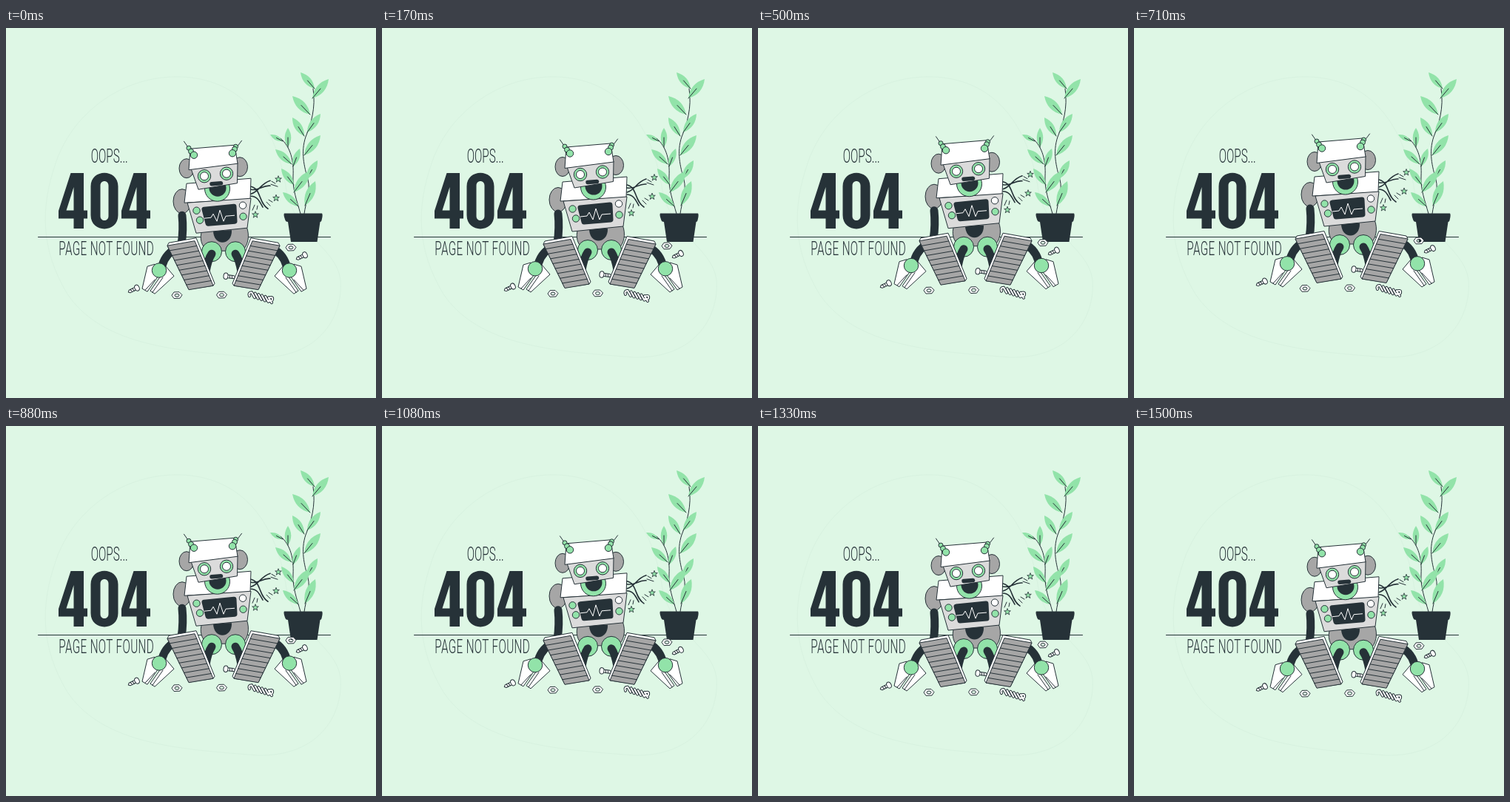
Write an HTML page that moves like this. It is 500x500 px and loops after 1.54 s.

```html
<!DOCTYPE html>
<html lang="en">
<head>
<meta charset="utf-8">
<title>Page not found</title>
<style>
  html, body { margin: 0; width: 100%; height: 100%; overflow: hidden; background: #def7e5; }
  svg { display: block; width: 100%; height: 100%; }
  text { font: 300 25px Roboto, sans-serif; text-anchor: middle; fill: #263238; }
  .ink { fill: #263238; }
  .line { fill: none; stroke: #263238; stroke-linecap: round; }
  .tube { fill: none; stroke: #263238; stroke-width: 11; stroke-linecap: round; }
  .part { stroke: #263238; stroke-linejoin: round; }
  .white { fill: #fff; }
  .light { fill: #dbdbdb; }
  .gray { fill: #a6a6a6; }
  .green { fill: #92e3a9; }
</style>
</head>
<body>
<svg viewBox="0 0 500 500">
  <defs>
    <g id="forearm">
      <path class="tube" d="M234 297C224 301 215 308 211 322"/>
      <path class="part white" d="M191 323L201 320L205 337L191 357L184 353Z"/>
      <path class="part white" d="M216 323L227 336L201 360L195 356L209 336Z"/>
      <path class="line" d="M201 341L188 355M212 338L198 358"/>
      <circle class="part green" cx="207" cy="328.3" r="9.7"/>
    </g>
    <g id="leg">
      <circle class="part green" cx="278" cy="303" r="13.5"/>
      <path class="tube" d="M278 306Q273 313 270 330"/>
      <path class="part white" d="M218 295L220 291L257 284.500L282 346L280 349L247 354Z"/>
      <path class="part gray" d="M218 295L255 288.500L280 349L247 354.500Z"/>
      <path class="line" id="treads"/>
    </g>
    <path id="nut" class="part white" fill-rule="evenodd" d="M-7 0L-4 -4.300L3 -4.500L7 -.500L4 4L-4 4.300ZM-3 0A3 2 0 0 0 3 0A3 2 0 0 0 -3 0Z"/>
    <g id="screw">
      <path class="part white" d="M0 -2H11L13 0L11 2H0Z"/>
      <path class="line" d="M5 -2L6 2M8 -2L9 2"/>
      <ellipse class="part white" rx="3" ry="4.2"/>
    </g>
    <path id="star" class="part green" stroke-width=".8" d="M0 -4.5L1.2 -1.3L4.3 -1.3L1.8 .8L2.8 4L0 2L-2.8 4L-1.8 .8L-4.3 -1.3L-1.2 -1.3Z"/>
    <path id="coil" d="M329 363Q327 358 332 358"/>
  </defs>

  <path fill="none" stroke="#d8f2e0" d="M235 66C160 64 92 112 68 180C45 245 48 300 82 358C130 432 240 437 340 445C425 447 456 388 452 340C446 297 392 281 379 220C365 125 315 68 235 66Z"/>

  <text transform="translate(139.7 182) scale(.61 1)">OOPS...</text>
  <g class="ink" fill-rule="evenodd" role="img" aria-label="404">
    <path id="four" d="M87.500 196H105V246.500H110V257.500H105V271H91.500V257.500H71V247ZM91.500 246.500V215L81.500 246.500Z"/>
    <path d="M114.500 214C114.500 189.500 151.500 189.500 151.500 214V253C151.500 277.500 114.500 277.500 114.500 253ZM127.500 213V254C127.500 262 138.500 262 138.500 254V213C138.500 205 127.500 205 127.500 213Z"/>
    <use href="#four" x="85"/>
  </g>
  <text transform="translate(135.700 307) scale(.61 1)" letter-spacing=".6">PAGE NOT FOUND</text>
  <path class="line" d="M43.500 282.500H438.500"/>

  <g id="plant">
    <path class="line" d="M403 251C405 235 412 220 408 205C403 187 398 168 405 147C412 130 419 108 415 82"/>
    <path class="line" d="M398 251C393 233 387 218 388 200C389 180 385 161 371 149"/>
  </g>
  <path class="ink" d="M376 250.500H427Q428.500 252 426.500 260Q426 262 424.500 262L420.500 289H385L381 262Q378 262 377.500 260Q374.500 252 376 250.500Z"/>

  <g id="robot">
    <g class="line" stroke-width="1.6">
      <path d="M331 225C342 222 344 211 357 207M331 219C343 221 346 213 357 214M331 215C345 218 341 237 354 245M331 228C340 228 343 236 347 243"/>
      <path stroke-width="1" d="M359 208L364 211M358 212L367 215M355 233L360 236M352 236L357 241M336 240L333 247M340 241L339 246"/>
    </g>
    <use href="#star" x="368" y="205"/>
    <use href="#star" x="365" y="230.500"/>
    <use href="#star" x="337" y="253"/>

    <ellipse class="part gray" cx="238" cy="235" rx="12" ry="16.500"/>
    <path class="tube" d="M238 254Q240 273 237 293"/>

    <path class="part gray" d="M265 274L325 269C330 282 327 295 319 302H272C264 295 261 285 265 274Z"/>
    <path class="ink" d="M280 274H305C306 295 280 297 280 274Z"/>
    <use href="#forearm"/>
    <use href="#forearm" transform="matrix(-1 0 0 1 590 0)"/>

    <path class="part white" d="M244 211L331 204L330 232L241 237Z"/>
    <path class="part light" d="M245 237L331 231L326 271L257 278Z"/>
    <circle class="part green" cx="257.500" cy="247.500" r="4.700"/>
    <circle class="part green" cx="262" cy="260.500" r="4.700"/>
    <circle class="part white" cx="320" cy="240.500" r="4.700"/>
    <circle class="part green" cx="320.500" cy="255.500" r="4.700"/>
    <path class="part ink" stroke-width="7" d="M268 246L308 242L309 262L273 265Z"/>
    <path fill="none" stroke="#fff" d="M268 258L277 257L280 252L285 262L289 247L294 262L297 255L309 254"/>

    <circle class="part green" cx="285.500" cy="218" r="17"/>
    <circle class="ink" cx="286" cy="217" r="11.500"/>
    <ellipse class="part gray" cx="244" cy="190.500" rx="10" ry="13"/>
    <ellipse class="part gray" cx="316" cy="188.500" rx="10.500" ry="13"/>
    <path class="part light" d="M250 191L313 183L312.500 210.500L260 219Z"/>
    <path class="part white" d="M249 164L309 159L313 184L247 192.500Z"/>
    <circle class="part green" cx="268" cy="201" r="8.700"/>
    <circle class="part white" cx="268" cy="201" r="5.500"/>
    <circle class="part green" cx="298" cy="197.500" r="8.700"/>
    <circle class="part white" cx="298" cy="197.500" r="5.500"/>
    <path class="line" stroke-width="5.500" d="M278 211.500L290.500 210.500"/>
    <path class="line" d="M240.500 154L253 172M318.500 153L305 171"/>
    <g class="part green">
      <circle cx="247" cy="163" r="3"/>
      <circle cx="250" cy="167.500" r="3.500"/>
      <circle cx="254" cy="172.500" r="4.700"/>
      <circle cx="310.500" cy="161" r="3"/>
      <circle cx="309" cy="164.500" r="3.500"/>
      <circle cx="306" cy="170" r="4.700"/>
    </g>

    <use href="#screw" transform="translate(297 336) rotate(8)"/>
    <use href="#leg"/>
    <use href="#leg" transform="matrix(-1 0 0 1 588 0)"/>

    <use href="#screw" transform="translate(177 352) rotate(154)"/>
    <use href="#screw" transform="translate(404 307.500) rotate(154)"/>
    <use href="#nut" x="231" y="362"/>
    <use href="#nut" x="291.500" y="361.500"/>
    <use href="#nut" x="385" y="297.500"/>
    <g fill="none" stroke-linecap="round">
      <use href="#coil" stroke="#263238" stroke-width="4"/>
      <use href="#coil" stroke="#fff" stroke-width="2"/>
    </g>
  </g>
</svg>
<script>
const PERIOD = 1540, LIFT = 10, PHASE = 60;
const $ = id => document.getElementById(id);

function add(parent, name, attrs) {
  const el = document.createElementNS("http://www.w3.org/2000/svg", name);
  for (const key in attrs) el.setAttribute(key, attrs[key]);
  parent.append(el);
}

function leaf(x, y, tipX, tipY) {
  const dx = tipX - x, dy = tipY - y;
  const side = s => `${x + dx * .5 - dy * s} ${y + dy * .5 + dx * s}`;
  add($("plant"), "path", { class: "green", d: `M${x} ${y}Q${side(.33)} ${tipX} ${tipY}Q${side(-.33)} ${x} ${y}` });
  add($("plant"), "path", { class: "line", d: `M${x} ${y}l${dx * .5} ${dy * .5}` });
}

[
  [417, 82, 398, 60], [414, 95, 436, 69], [411, 117, 387, 92], [407, 141, 425, 116],
  [403, 146, 387, 121], [403, 172, 425, 145], [406, 204, 421, 179], [404, 240, 418, 207],
  [374, 153, 357, 144], [381, 161, 381, 135], [386, 184, 364, 164], [388, 187, 397, 163],
  [389, 212, 372, 190], [389, 222, 411, 193], [395, 241, 374, 222]
].forEach(points => leaf(...points));

let treads = "";
for (let i = 1; i < 9; i++) {
  const t = i / 9;
  treads += `M${218 + 29 * t} ${295 + 59.5 * t}L${255 + 25 * t} ${288.5 + 60.5 * t}`;
}
$("treads").setAttribute("d", treads);

let coil = $("coil").getAttribute("d");
for (let i = 0; i < 6; i++) coil += `M${332 + i * 4.6} ${358 + i * 1.4}l4 7`;
$("coil").setAttribute("d", coil + "M355 366Q361 363 360 368Q359 371 354 369");

function draw() {
  const phase = (performance.now() + PHASE) % PERIOD / PERIOD;
  const rise = LIFT * (1 - Math.abs(1 - 2 * phase));
  $("robot").setAttribute("transform", `translate(0 ${-rise})`);
  requestAnimationFrame(draw);
}
draw();
</script>
</body>
</html>
```
